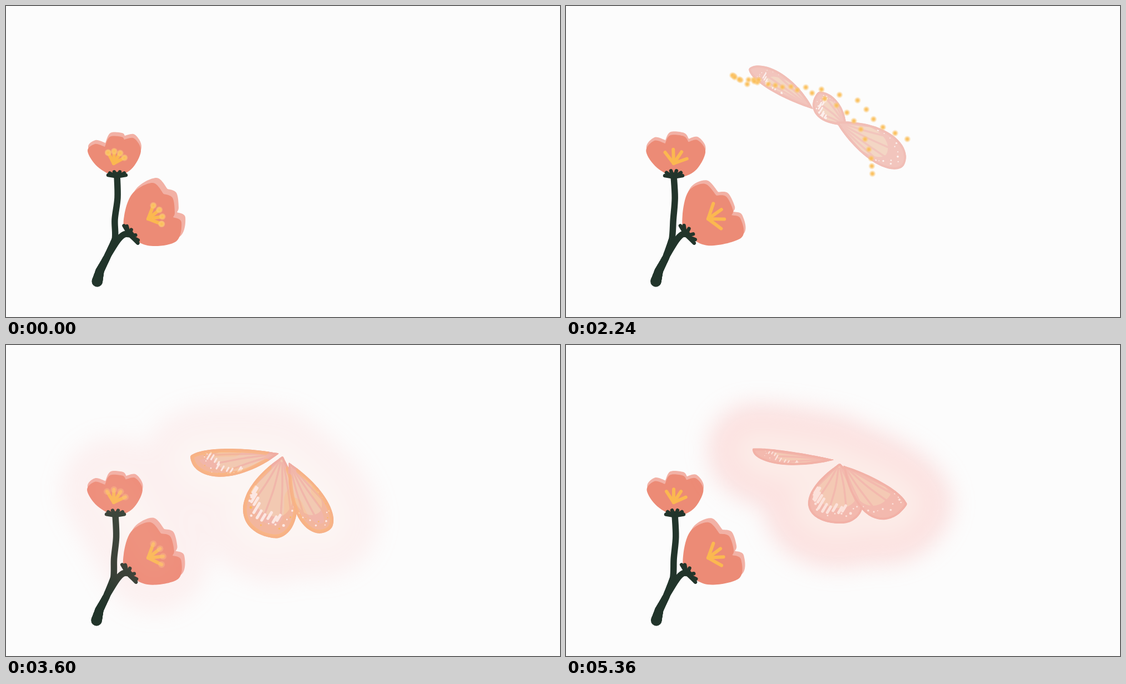
An HTML page with a canvas for the animation above (5440 ms loop, 998 by 561 pixels).

```html
<!DOCTYPE html>
<html lang="en">
<head>
<meta charset="utf-8">
<title>Blossom and butterfly</title>
<style>
html, body { margin: 0; width: 100%; height: 100%; overflow: hidden; background: #fcfcfc; }
canvas { display: block; }
</style>
</head>
<body>
<canvas id="stage" width="998" height="561"></canvas>
<script>
const W = 998, H = 561, PAD = 90, LOOP = 5440, STEP = 80;
const BEATS = 24, BLOOM = 10; // drawings per wing beat and per bloom
const ctx = document.getElementById('stage').getContext('2d');
const sheet = document.createElement('canvas');
sheet.width = W + 2 * PAD;
sheet.height = H + 2 * PAD;
const pen = sheet.getContext('2d');
pen.translate(PAD, PAD);

const GREEN = '#22352b', CORAL = '#ec8b76', PALE = '#f2b1a5', YELLOW = '#fbb850';
const PINK = '#efb4a9', EDGE = '#eeaaa0', PEACH = '#f1cab2', WHITE = '#fcece8', GOLD = '#fcb35e';

// ---------- helpers ----------
const mix = (a, b, k) => a + (b - a) * k;
const lerp = (a, b, k) => [mix(a[0], b[0], k), mix(a[1], b[1], k)];
const polar = ([x, y], a, r) => [x + Math.cos(a) * r, y + Math.sin(a) * r];
const rnd = i => { const v = Math.sin(i * 12.9898) * 43758.5453; return v - Math.floor(v); };
const points = s => s.split(' ').map(q => q.split(',').map(Number));
const morph = (a, b, k) => a.map((q, i) => lerp(q, b[i], k));
const repeat = (n, f) => Array.from({ length: n }, (_, i) => f(i));

function along(p, u) {
  const x = Math.min(u, 0.9999) * (p.length - 1), i = Math.floor(x);
  return lerp(p[i], p[i + 1], x - i);
}

// Piecewise linear value: ramp(t, time, value, time, value, ...)
function ramp(t, ...keys) {
  if (t <= keys[0]) return keys[1];
  for (let i = 2; i < keys.length; i += 2)
    if (t <= keys[i]) return mix(keys[i - 1], keys[i + 1], (t - keys[i - 2]) / (keys[i] - keys[i - 2]));
  return keys[keys.length - 1];
}

function curve(c, p, open) {
  const n = p.length;
  const at = i => open ? p[Math.max(0, Math.min(n - 1, i))] : p[(i + n) % n];
  c.beginPath();
  c.moveTo(...p[0]);
  for (let i = 0; i < (open ? n - 1 : n); i++) {
    const [a, b, d, e] = [at(i - 1), at(i), at(i + 1), at(i + 2)];
    c.bezierCurveTo(b[0] + (d[0] - a[0]) / 6, b[1] + (d[1] - a[1]) / 6,
      d[0] - (e[0] - b[0]) / 6, d[1] - (e[1] - b[1]) / 6, d[0], d[1]);
  }
  if (!open) c.closePath();
}

function fill(c, p, color) {
  curve(c, p);
  c.fillStyle = color;
  c.fill();
}

function stroke(c, p, color, width, open = true) {
  curve(c, p, open);
  c.strokeStyle = color;
  c.lineWidth = width;
  c.lineCap = c.lineJoin = 'round';
  c.stroke();
}

function disc(c, [x, y], r, color) {
  c.beginPath();
  c.arc(x, y, r, 0, 7);
  c.fillStyle = color;
  c.fill();
}

function layer(alpha, filter, draw) {
  if (alpha <= 0) return;
  pen.clearRect(-PAD, -PAD, sheet.width, sheet.height);
  draw(pen);
  ctx.save();
  ctx.globalAlpha = alpha;
  ctx.filter = filter;
  ctx.drawImage(sheet, -PAD, -PAD);
  ctx.restore();
}

// ---------- plant ----------
// Outline: foot, left side, three petals with two notches, right side
const blossoms = [
  {
    shut: points('197,306 165,290 147,262 160,249 178,254 187,236 208,236 213,241 231,239 243,262 226,294'),
    open: points('202,311 163,293 142,262 158,238 179,243 188,231 216,234 227,249 243,245 258,265 238,300'),
    shift: [[1, -7], [0, -5]], heart: [194, 284], aim: [-1.27, -1.3], reach: 22, cup: 16, tilt: 0
  },
  {
    shut: points('217,408 213,378 228,338 264,319 284,339 300,346 304,372 301,381 316,390 306,425 255,432'),
    open: points('215,410 207,380 214,332 238,322 260,344 279,342 298,364 296,374 313,378 324,412 255,432'),
    shift: [[7, -9], [0, -4]], heart: [256, 384], aim: [-0.42, -0.2], reach: 26, cup: 20, tilt: 0.9
  }
];
const stamens = (f, k) => repeat(4, i =>
  polar(f.heart, mix(...f.aim, k) + (i - 1.5) * (0.52 + 0.2 * k), f.reach + 6 * k));

function flower(f, k, tipAlpha) {
  const p = morph(f.shut, f.open, k), [dx, dy] = lerp(...f.shift, k), tips = stamens(f, k);
  const front = p.flatMap((q, i) => i === 4 || i === 7 ? [q, q] : [q]); // sharp notches
  fill(ctx, front.map(([x, y]) => [x + dx, y + dy]), PALE);
  fill(ctx, front, CORAL);
  for (const q of tips) stroke(ctx, [f.heart, q], YELLOW, 6);
  ctx.globalAlpha = tipAlpha;
  for (const q of tips) disc(ctx, q, 6, '#fcc183');
  ctx.globalAlpha = 1;
}

function calyx([x, y], f, k) {
  ctx.save();
  ctx.translate(x, y);
  ctx.rotate(f.tilt);
  for (let i = 0; i < 6; i++) {
    const a = Math.PI * (1 + i / 5);
    stroke(ctx, [[Math.cos(a) * 4, 2], [Math.cos(a) * f.cup, Math.sin(a) * (6 + 6 * k)]], GREEN, 6.5);
  }
  ctx.restore();
}

function plant(phase, tipAlpha) {
  const k = (phase / 9) ** 1.5;
  const lean = (x, y, s) => [x - s * phase, y];
  for (const f of blossoms) flower(f, k, tipAlpha);
  const top = [200 - phase, 305 + k * 2], cup = lean(225, 412, 1.1);
  const fork = lean(196, 422, 0.9), knee = lean(182, 453, 0.3);
  stroke(ctx, [top, lean(201, 346, 0.8), lean(196, 385, 0.45), fork, knee], GREEN, 11.5);
  stroke(ctx, [knee, lean(201, 423, 0.4), lean(213, 412, 0.6), cup], GREEN, 11.5);
  const foot = [fork, knee, lean(169, 478, 0.3), lean(164, 498, 0.4)];
  for (let u = 0; u <= 1; u += 0.02) disc(ctx, along(foot, u), 6 + 4 * u * u, GREEN);
  calyx(top, blossoms[0], k);
  calyx(cup, blossoms[1], k);
}

// ---------- butterfly ----------
// A wing is a teardrop from root to tip; a negative width is the folded side.
function drop(x0, y0, x1, y1, left, right) {
  const dx = x1 - x0, dy = y1 - y0, len = Math.hypot(dx, dy);
  return repeat(16, i => {
    const t = i / 16 * 2 * Math.PI, u = (1 - Math.cos(t)) / 2;
    const v = -Math.sin(t) * Math.sin(t / 2) ** 0.85 * (i < 8 ? left : right) / len;
    return [x0 + dx * u - dy * v, y0 + dy * u + dx * v];
  });
}

const edgeOn = [drop(442, 174, 309, 133, 14, 18), drop(510, 205, 432, 178, 42, 14), drop(486, 198, 600, 330, 52, 38)];
const raised = [drop(452, 220, 396, 48, 36, 82), drop(486, 244, 522, 87, 66, 72), drop(490, 242, 635, 160, 56, 32)];
const gliding = [drop(482, 207, 336, 188, 26, 6), drop(493, 214, 497, 322, -75, -50), drop(500, 218, 613, 290, 16, 64)];
const lowered = [drop(494, 192, 331, 208, 54, 20), drop(500, 197, 478, 357, -78, -44), drop(513, 211, 570, 350, 38, 40)];

function wingsAt(beat) {
  const [a, b, k] = beat < 8 ? [edgeOn, raised, beat / 8]
    : beat < 16 ? [raised, gliding, (beat - 8) / 8]
    : beat < 20 ? [gliding, lowered, (beat - 16) / 4]
    : [lowered, edgeOn, (beat - 20) / 4];
  return a.map((p, i) => morph(p, b[i], k));
}

function wing(c, p, n, gold) {
  const root = p[0], seed = 1 + n * 30;
  const inner = (u, s) => lerp(root, along(p, u / 15), s);
  const size = Math.min(1, Math.max(0.45, Math.hypot(p[5][0] - p[11][0], p[5][1] - p[11][1]) / 80));
  c.save();
  curve(c, p);
  c.clip();
  fill(c, p, PINK);
  fill(c, p.map(q => lerp(root, q, 0.74)), PEACH);
  for (let u = 2; u < 15; u += 1.6)
    stroke(c, [inner(u, 0.08), inner(u + 0.4, 0.42), inner(u + 0.2, 0.8)], PINK, 3.5);
  c.globalAlpha = gold * 0.4;
  stroke(c, p.slice(4, 13), GOLD, 46 * size);
  c.globalAlpha = 1;
  if (n < 2)
    for (let i = 0; i < 10; i++) {
      const [x, y] = inner(4.3 + i * 0.45, 0.7 + rnd(seed + i) * 0.1);
      const l = size * (4 + rnd(seed + i + 20) * 5);
      stroke(c, [[x - l * 0.6, y + l], [x + l * 0.6, y - l]], WHITE, 5 * size);
    }
  for (let i = 0; i < 16; i++)
    disc(c, inner(4 + i * 0.5, 0.83 + rnd(seed + i + 40) * 0.09),
      size * (1.2 + rnd(seed + i + 60) * 1.4), gold > 0 && i % 3 === 0 ? YELLOW : WHITE);
  stroke(c, p, EDGE, 8, false);
  c.globalAlpha = gold;
  stroke(c, p.slice(2, 15), GOLD, 13);
  c.restore();
}

// ---------- glow and pollen ----------
function halo(c, wings, plantShare) {
  const stem = [[[196, 262], [268, 386]]];
  for (const [color, grow] of [['#faa2a0', 160], ['#fac8ba', 64]]) {
    c.globalAlpha = plantShare;
    for (const p of stem) stroke(c, p, color, grow * 1.2);
    c.globalAlpha = 1;
    for (const p of wings) {
      fill(c, p, color);
      stroke(c, p, color, grow, false);
    }
  }
}

const GRAINS = 18;
const trail = points('344,155 302,190 303,235 355,261 402,267 409,315 424,372 482,379');
const outer = points('309,127 293,56 312,28 418,28 500,28 651,28 699,56 748,101');
const inside = points('350,111 348,76 469,56 547,56 603,109 657,134 675,166 622,226');

function pollen(t) {
  const alpha = ramp(t, 2880, 1, 3200, 0);
  if (alpha <= 0) return;
  const tips = blossoms.flatMap(f => stamens(f, 0));
  const out = ramp(t, 0, 0, 640, 0.06, 1200, 0.33, 1667, 1);
  const rise = ramp(t, 1667, 0, 2667, 1), gone = ramp(t, 2667, 0, 3200, 1);
  ctx.globalAlpha = alpha;
  for (let i = 0; i < (rise > 0 ? 2 : 1) * GRAINS; i++) {
    const u = i % GRAINS / (GRAINS - 1);
    const start = lerp(tips[Math.floor(u * 7.99)], along(trail, u), out);
    let [x, y] = lerp(start, along(i < GRAINS ? outer : inside, u), rise);
    x += (x - 500) * 0.11 * gone;
    y += (y - 120) * 0.28 * gone;
    const g = ctx.createRadialGradient(x, y, 0, x, y, 6.5);
    g.addColorStop(0, '#fabc55');
    g.addColorStop(0.35, 'rgba(251,194,98,.9)');
    g.addColorStop(1, 'rgba(252,205,130,0)');
    disc(ctx, [x, y], 6.5, g);
  }
  ctx.globalAlpha = 1;
}

// ---------- scene ----------
function draw(time) {
  const n = Math.floor(time % LOOP / STEP);
  // The first drawing of every wing beat stays for two steps.
  const cell = BEATS * Math.floor(n / 25) + Math.max(0, n % 25 - 1);
  const t = cell * 2000 / BEATS;

  ctx.fillStyle = '#fcfcfc';
  ctx.fillRect(0, 0, W, H);

  const onPlant = ramp(t, 3280, 0, 4000, 1, 5200, 1, 5330, 0);
  const onWings = ramp(t, 3280, 0, 4000, 1);
  const gold = ramp(t, 3280, 0, 3920, 1, 4800, 1, 5280, 0);
  const shown = ramp(t, 1200, 0, 1667, 0.22, 2400, 1);
  const wings = wingsAt(cell % BEATS);

  plant(cell % BLOOM, onPlant);
  layer(shown, 'none', c => wings.forEach((p, i) => wing(c, p, i, gold)));
  layer(0.3 * onWings, 'blur(20px)', c => halo(c, wings, onPlant / onWings));
  pollen(t);
}

function tick() {
  draw(performance.now());
  requestAnimationFrame(tick);
}
tick();
</script>
</body>
</html>
```
